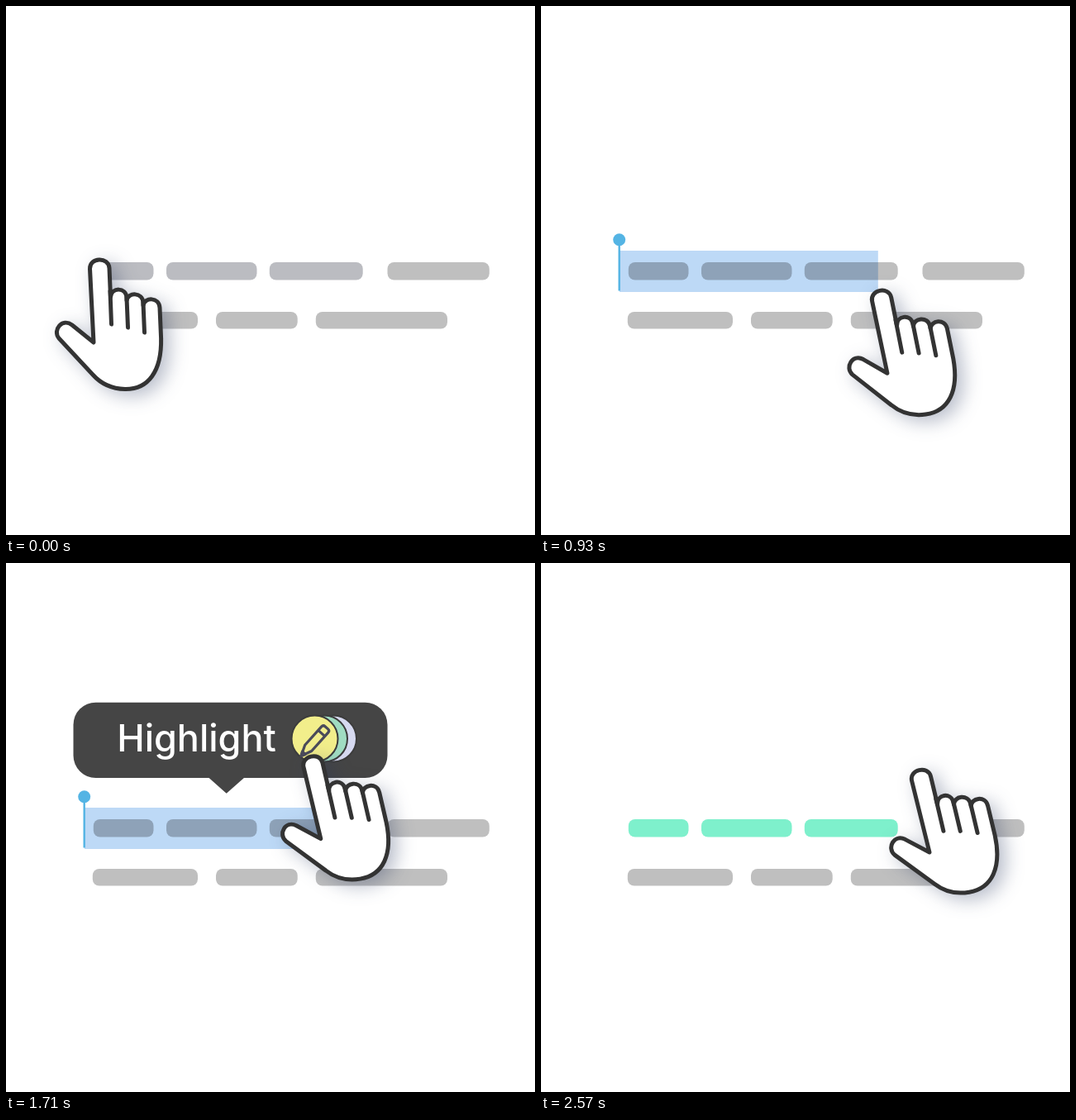
Animation of 640 by 640 pixels, one loop 2860 ms. Source, as an HTML page:

```html
<!DOCTYPE html>
<html lang="en">
<head>
<meta charset="utf-8">
<title>Select and highlight</title>
<style>
  html, body { margin: 0; width: 100%; height: 100%; overflow: hidden; background: #fff; }
  svg { display: block; width: 100%; height: 100%; }
  #selection { mix-blend-mode: multiply; }
  #shadow { filter: drop-shadow(8px 6px 11px rgba(40, 55, 95, .33)); }
  #hand { stroke: #333; stroke-width: 5; stroke-linecap: round; stroke-linejoin: round; }
  text { font: 500 45px Inter, "Open Sans", sans-serif; fill: #fff; text-anchor: middle; }
</style>
</head>
<body>
<svg viewBox="0 0 640 640">
  <g id="bars"></g>
  <rect id="selection" x="95" y="296" height="50"/>
  <g id="startHandle" fill="#54b4e4">
    <rect x="93.5" y="283" width="2.4" height="61.5"/>
    <circle cx="94.7" cy="282.8" r="7.5"/>
  </g>
  <g id="endHandle">
    <rect x="445.3" y="292" width="2.4" height="58"/>
    <circle cx="446.5" cy="349.5" r="7.5"/>
  </g>
  <g id="popup">
    <path d="M245 259.5H288.5L266.7 278.7Z" fill="#454545"/>
    <rect x="81.5" y="168.7" width="380" height="91.3" rx="27" fill="#454545"/>
    <text x="230.5" y="228">Highlight</text>
    <g stroke="#3c3c3c" stroke-width="2">
      <circle cx="396" cy="212.5" r="28" fill="#d6d9f0"/>
      <circle cx="385" cy="212.5" r="28" fill="#a0dcc2"/>
      <circle cx="373.5" cy="212.5" r="28" fill="#f2ee8b"/>
    </g>
    <g transform="translate(357 233.5) rotate(42)" fill="none" stroke="#4b4b5a" stroke-width="3.2" stroke-linejoin="round">
      <path d="M0 0L-5.4 -13V-43Q-5.4 -46 -2.4 -46H2.4Q5.4 -46 5.4 -43V-13ZM-5.4 -37H5.4"/>
      <path d="M0 0L-2.5 -5H2.5Z"/>
    </g>
  </g>
  <g id="shadow">
    <g id="hand">
      <path fill="#fff" d="M106 407L101.5 318C101 304 124 303 125 317L126.5 352C128 340 145 340 146 353V356C148 346 165 346 166 359V362C168 352 185 352 186 365L187.6 402C188.5 442 172 464 144 463.5C125 463 113 455 105 446L64 402C56 392 68 377 80 386Z"/>
      <path fill="none" d="M126 345L127.5 385M146 353L147.5 389M166 359L167.5 395"/>
    </g>
  </g>
</svg>
<script>
const LOOP = 2860, STEP = 71.5;
const TAP = 1787, LEAVE = 1930;
const $ = id => document.getElementById(id);

const grey = [191, 191, 191], cool = [187, 188, 193], mint = [126, 240, 204];
const white = [255, 255, 255], blue = [189, 217, 246], cyan = [175, 245, 249];
const handleBlue = [84, 180, 228], handleTeal = [34, 200, 220];

const ramp = (t, from, to) => Math.min(1, Math.max(0, (t - from) / (to - from)));
const lerp = (a, b, k) => a + (b - a) * k;
const sine = k => (1 - Math.cos(Math.PI * k)) / 2;
const easeOut = (k, power) => 1 - (1 - k) ** power;
const rgb = (a, b, k) => `rgb(${a.map((v, i) => Math.round(lerp(v, b[i], k)))})`;

function set(element, attrs) {
  for (const name in attrs) element.setAttribute(name, attrs[name]);
}

// Each bar is a pair of left and right edges
function addRow(y, height, ...edges) {
  for (let i = 0; i < edges.length; i += 2) {
    const bar = document.createElementNS("http://www.w3.org/2000/svg", "rect");
    set(bar, { x: edges[i], y, width: edges[i + 1] - edges[i], height, rx: 8, fill: rgb(grey, grey, 0) });
    $("bars").append(bar);
  }
}
addRow(310, 21.5, 105.8, 178.5, 194, 303.5, 318.8, 431.7, 461.5, 584.8);
addRow(370, 20.5, 104.8, 232, 254, 352.7, 374.8, 534);

// The hand drags across the line, reaches for the button, then leaves
function handPose(t, drag) {
  const reach = ramp(t, 1430, TAP), leave = sine(ramp(t, LEAVE, 2574));
  if (t >= LEAVE) return [lerp(362, 470, leave), lerp(320, 350, leave), -11];
  if (t >= 1430) return [lerp(456.5, 362, reach), lerp(450.5, 320, easeOut(reach, 1.4)), lerp(-9, -11, reach)];
  return [lerp(106, 456.5, sine(drag)), lerp(407, 450.5, easeOut(drag, 1.25)), -9 * sine(ramp(t, 0, 286))];
}

function draw(t) {
  const drag = ramp(t, 0, 1180);
  const [x, y, angle] = handPose(t, drag);
  set($("hand"), { transform: `translate(${x} ${y}) rotate(${angle}) translate(-106 -407)` });

  const marked = ramp(t, TAP, LEAVE), clear = 1 - ramp(t, LEAVE, 2145);
  [...$("bars").children].slice(0, 3).forEach(bar =>
    set(bar, { fill: rgb(t < 500 ? cool : grey, mint, marked) }));

  const tint = lerp(blue[0], cyan[0], marked), strength = ramp(t, 290, 860) * clear;
  const selected = blue.map((v, i) => lerp(v, cyan[i], marked));
  set($("selection"), {
    width: Math.max(0, lerp(81, 447, sine(drag)) - 95),
    fill: rgb(white, selected, strength)
  });

  set($("startHandle"), { opacity: ramp(t, 290, 500) * (1 - ramp(t, 1859, 2082)) });
  set($("endHandle"), { opacity: ramp(t, 1001, 1144) * clear, fill: rgb(handleBlue, handleTeal, marked) });

  // A polynomial spring: dips, overshoots, then settles at full size
  const pop = ramp(t, 1001, 1287);
  const scale = 1 + 4.5 * pop ** 2 * (1 - pop) * (pop - .625) - .02 * marked;
  set($("popup"), {
    opacity: ramp(t, 1001, 1244) * (1 - ramp(t, TAP, 1960)),
    transform: `translate(271.5 310) scale(${scale}) translate(-271.5 -310)`
  });
}

const start = performance.now();
function tick() {
  const t = (performance.now() - start) % LOOP;
  draw(Math.min(39, Math.floor((t + 5.5) / STEP)) * STEP);
  requestAnimationFrame(tick);
}
tick();
</script>
</body>
</html>
```
